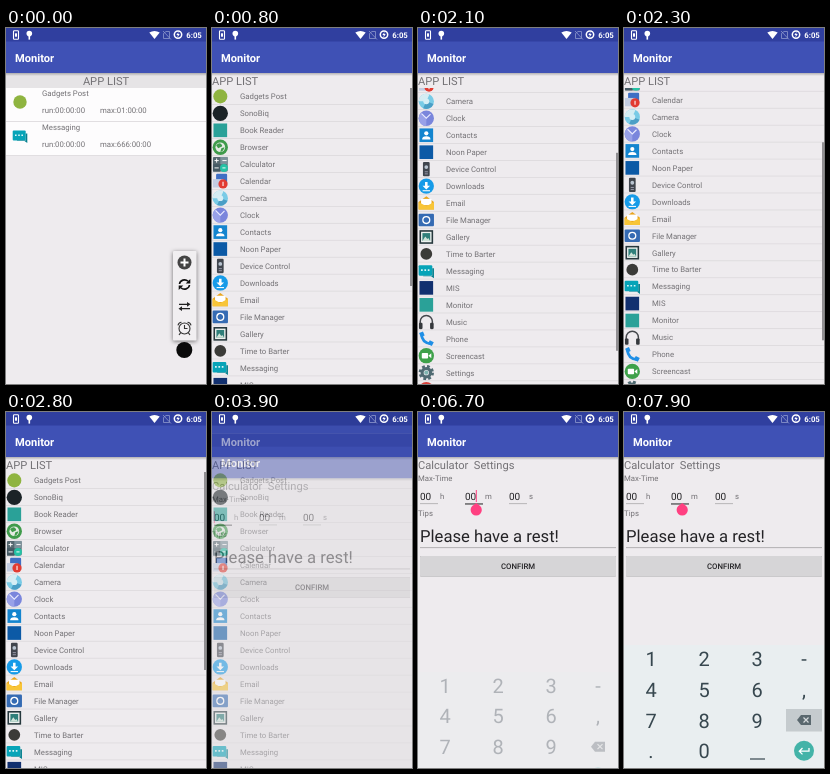
Recreate the animation shown at these times as an HTML page. Size 200 by 356 pixels, loop 8 s.

```html
<!DOCTYPE html>
<html lang="en">
<head>
<meta charset="utf-8">
<title>Monitor</title>
<style>
  html, body { margin: 0; height: 100%; overflow: hidden; background: #000; }
  svg { display: block; }
  text { font-family: Roboto, sans-serif; white-space: pre; text-rendering: geometricPrecision; }
</style>
</head>
<body>
<svg id="stage" width="200" height="356" viewBox="0 0 200 356"></svg>
<script>
const GREY = '#737175', INK = '#242326', PINK = '#ff4081', SMALL = 7.78, LARGE = 11.11;

const rect = (x, y, w, h, fill, more = '') =>
  `<rect x="${x}" y="${y}" width="${w}" height="${h}" fill="${fill}" ${more}/>`;
const disc = (x, y, r, fill, more = '') =>
  `<circle cx="${x}" cy="${y}" r="${r}" fill="${fill}" ${more}/>`;
const shape = (d, fill) => `<path d="${d}" fill="${fill}"/>`;
const line = (d, color, width = 1, more = '') =>
  `<path d="${d}" fill="none" stroke="${color}" stroke-width="${width}" ${more}/>`;
// y is the middle of the capital letters
const text = (x, y, s, size = SMALL, fill = GREY, more = '') =>
  `<text x="${x}" y="${y + size * 0.355}" font-size="${size}" fill="${fill}" ${more}>${s}</text>`;
const group = (id, body) => `<g id="${id}">${body}</g>`;
const at = (x, y, body, scale = 1) => `<g transform="translate(${x} ${y}) scale(${scale})">${body}</g>`;
const MID = 'text-anchor="middle" ', MEDIUM = 'font-weight="500" ', BOLD = 'font-weight="600" ';

// App icons, drawn around 0,0
const tile = fill => rect(-6.5, -6.5, 13, 13, fill);
const icon = {
  news: disc(0, 0, 6.7, '#8fb440'),
  sound: disc(0, 0, 7.3, '#1b2327'),
  teal: tile('#2aa198'),
  browser: disc(0, 0, 7.3, '#3f9b4b') + disc(0, 0, 4.6, '#e4ebe4') +
    shape('M-4-2Q-1-5 1-3T0 0L-2 1ZM1 1L4 0Q3 4 0 4.4Z', '#3f9b4b'),
  calculator: rect(-7, -7, 14, 14, '#566870', 'rx="1"') + rect(0, -7, 7, 7, '#7d929b') +
    rect(-7, 0, 7, 7, '#455a64') + disc(3.5, 3.5, 3.8, '#25c2a5') +
    line('M-5.5-3.5h4M-3.5-5.5v4M2-3.5h4M-5.5 3.5h4M2 3.5h3', '#fff', 0.9),
  calendar: rect(-4, -7, 10.5, 10, '#3f6fc4', 'rx="1"') + rect(-7, -2, 10, 8, '#c3cde2') +
    disc(2.6, 2.6, 4.4, '#e23b32') + line('M2.6 .6v4', '#fff'),
  camera: disc(0, 0, 7.3, '#79cbe6') + shape('M0 0L-7.3 0A7.3 7.3 0 0 1 3-6.6Z', '#d5ecf2') +
    shape('M0 0L6.9 2.5A7.3 7.3 0 0 1-3 6.6Z', '#4b9fc6') + disc(0, 0, 2.8, '#d6eef5'),
  clock: disc(0, 0, 7.3, '#7a86dc') + shape('M-5-5.2L0 0V7.3A7.3 7.3 0 0 1-5-5.2Z', '#98a1e8') +
    line('M-4.5-4.5L0 0L4-4', '#e8eaff', 1.1),
  contacts: tile('#1485cf') + disc(0, -1.8, 2, '#fff') + shape('M-4 4Q-4 1 0 1T4 4Z', '#fff'),
  paper: tile('#0c5aa6'),
  remote: rect(-3.2, -6.8, 6.4, 13.6, '#40454d', 'rx="1"') + disc(0, -2, 1.8, '#b9c4d0') +
    line('M-1.5 2.5h3M-1.5 4.5h3', '#aab', 0.8),
  downloads: disc(0, 0, 7.3, '#169be8') + shape('M-1.2-4h2.4v3.6h2.4L0 3.2-3.6-.4h2.4Z', '#fff') +
    line('M-3.5 4.4h7', '#fff'),
  email: shape('M-7.3-1L0-6.5 7.3-1V6H-7.3Z', '#e9a41c') + rect(-5, -4, 10, 6, '#fff') +
    shape('M-7.3-1L0 3 7.3-1V6H-7.3Z', '#f8c537'),
  files: rect(-7.3, -6, 14.6, 12, '#356bb3', 'rx="1"') + disc(0, 0, 3.3, 'none', 'stroke="#fff" stroke-width="1.2"'),
  gallery: tile('#26383d') + rect(-5, -5, 10, 10, '#eef2f0') + rect(-3.7, -3.7, 7.4, 7.4, '#2f7f7a') +
    shape('M-3.7 3.7L-1-.5 1 2 2 1 3.7 3.7Z', '#cfe3d8'),
  barter: disc(0, 0, 5.6, '#3b3b38'),
  messaging: rect(-7.3, -5.5, 13, 10, '#06a4b8', 'rx="1"') + shape('M5.7-2.5H7.3V7L4.5 5H-3V4.5H5.7Z', '#06808f') +
    line('M-5-.8h1.6M-1.8-.8h1.6M1.4-.8h1.6', '#d9f6f8', 1.6),
  mis: tile('#12306f'),
  music: line('M-5.8 3V0A5.8 6 0 0 1 5.8 0V3', '#45484c', 1.4) +
    rect(-7, 1, 3.4, 6, '#35383c', 'rx="1"') + rect(3.6, 1, 3.4, 6, '#35383c', 'rx="1"'),
  phone: line('M-4.6-5Q-4.5 4 4.8 5', '#1f8fe6', 2.6) +
    line('M-5-6.2l1.6 3.8M2.4 3.2l3.8 2', '#1f8fe6', 4),
  screencast: disc(0, 0, 7.3, '#3ea14a') + rect(-4.3, -2.6, 6, 5.2, '#fff', 'rx=".8"') + shape('M2 0L4.8-2.4V2.4Z', '#fff'),
  settings: disc(0, 0, 6, 'none', 'stroke="#4f6a72" stroke-width="2.6" stroke-dasharray="2.6 2.11"') +
    disc(0, 0, 4, 'none', 'stroke="#4f6a72" stroke-width="3"') + disc(0, 0, 2, '#7fb5b0'),
  recorder: disc(0, 0, 7.3, '#d8403a'),
};

const apps = [
  ['Gadgets Post', 'news'], ['SonoBiq', 'sound'], ['Book Reader', 'teal'], ['Browser', 'browser'],
  ['Calculator', 'calculator'], ['Calendar', 'calendar'], ['Camera', 'camera'], ['Clock', 'clock'],
  ['Contacts', 'contacts'], ['Noon Paper', 'paper'], ['Device Control', 'remote'],
  ['Downloads', 'downloads'], ['Email', 'email'], ['File Manager', 'files'], ['Gallery', 'gallery'],
  ['Time to Barter', 'barter'], ['Messaging', 'messaging'], ['MIS', 'mis'], ['Monitor', 'teal'],
  ['Music', 'music'], ['Phone', 'phone'], ['Screencast', 'screencast'], ['Settings', 'settings'],
  ['Sound Recorder', 'recorder'],
];
const ROW = 16.96, VIEW = 296, THUMB = 198;

const page = (id, body) => group(id,
  rect(0, 0, 200, 356, '#eeebee') + body + rect(0, 45, 200, 3, 'url(#shade)') +
  rect(0, 0, 200, 14, '#303f9f') + rect(0, 13.5, 200, 31.5, '#3f51b5') +
  text(9, 30, 'Monitor', LARGE, '#fff', BOLD));

const task = (y, name, max, image) =>
  rect(0, y, 200, 33.5, '#fdfcfd') + rect(0, y + 33, 200, 0.8, '#dcdadc') + at(14, y + 14, icon[image]) +
  text(36, y + 5.7, name) + text(36, y + 22.5, 'run:00:00:00') + text(94, y + 22.5, 'max:' + max);

const menu =
  rect(167, 223, 23.5, 89.5, '#f1eff1', 'rx="1" style="filter:drop-shadow(0 1px 2px #0008)"') +
  disc(178.5, 234.5, 7, '#444') + line('M174.5 234.5h8M178.5 230.5v8', '#fff', 2) +
  at(178.5, 256.5, line('M-5-.5A5 4.6 0 0 1 3.6-3.2M5 .5A5 4.6 0 0 1-3.6 3.2', '#111', 1.6) +
    shape('M5.8-5.6V-.9H1.2ZM-5.8 5.6V.9H-1.2Z', '#111')) +
  at(178.5, 278.5, line('M-5.5-2.2H3M5.5 2.2H-3', '#222', 1.3) +
    shape('M2.5-4.6L6-2.2 2.5.2ZM-2.5-.2L-6 2.2-2.5 4.6Z', '#222')) +
  at(178.5, 300.5, disc(0, 0, 5.5, 'none', 'stroke="#333" stroke-width="1.1"') +
    line('M0-3.5V0H3M-3.8 4.2L-5.5 6.5M3.8 4.2L5.5 6.5M-6.5-3.2A4 4 0 0 1-3-6.3M6.5-3.2A4 4 0 0 0 3-6.3', '#333', 1.1)) +
  disc(178.3, 322, 8, '#0a0a0a') + disc(178.5, 234.5, 10, '#000', 'id="tap" opacity="0"');

const home = page('home',
  rect(0, 45, 200, 15, '#e6e4e6') + text(100, 53, 'APP LIST', LARGE, GREY, MID) +
  task(60, 'Gadgets Post', '01:00:00', 'news') + task(94, 'Messaging', '666:00:00', 'messaging') + menu);

const list = page('list',
  text(0, 53, 'APP LIST', LARGE) +
  `<svg y="60" width="200" height="${VIEW}">` +
  group('rows', apps.map(([name, image], i) =>
    at(0, i * ROW, at(8.3, 8.4, icon[image], 1.05) + text(28, 8.5, name) +
      rect(0, 16.2, 200, 0.7, '#d9d6d9'))).join('') +
    rect(0, 4 * ROW, 200, ROW, '#000', 'id="press" opacity="0"')) +
  rect(198, 0, 2, THUMB, '#918f92', 'id="thumb"') + '</svg>');

const field = (x, unit, id) =>
  text(x, 84, '00', 10, INK) + text(x + 20, 84.5, unit) + rect(x, 91.3, 18, 0.8, '#aaa8aa', `id="${id}"`);

const settings = page('settings',
  text(0, 53, 'Calculator  Settings', LARGE) + text(0, 66, 'Max-Time') +
  field(2, 'h', 'hours') + field(47, 'm', 'minutes') + field(91, 's', 'seconds') +
  rect(1.8, 78, 1, 12, PINK, 'id="caret1"') + rect(57.8, 78, 1, 12, PINK, 'id="caret2"') +
  group('handle', shape('M58.2 91L62.2 94A5.6 5.6 0 1 1 54.2 94Z', PINK)) +
  text(0, 101.5, 'Tips') + text(2, 124, 'Please have a rest!', 16.67, INK) + rect(2, 135.3, 196, 0.8, '#a3a1a3') +
  rect(2, 144, 196, 20.5, '#d6d5d7', 'rx="1" style="filter:drop-shadow(0 .6px .6px #0006)"') +
  text(100, 154.5, 'CONFIRM', SMALL, INK, MID + MEDIUM));

const KEYS = ['123-', '456,', '789', '.0'];
const keyboard = group('keyboard',
  rect(0, 233, 200, 123, '#e9eef0') + rect(162, 297, 36, 22.5, '#c5cbce', 'id="erase"') +
  KEYS.map((row, r) => [...row].map((key, c) =>
    text([27, 80, 133, 180][c], 247 + r * 30.7, key, 20, '#37474f', MID)).join('')).join('') +
  line('M126 347h15', '#37474f', 1.2) +
  shape('M173 308L177 303H187V313H177Z', '#5a686e') + line('M179.5 305.5l5 5m0-5l-5 5', '#d5dadc', 1.2) +
  disc(180, 338.8, 10, '#43b3a8') +
  line('M185 336v3.2H175.5M178.5 336l-3.2 3.2 3.2 3.2', '#fff', 1.3));

const status =
  rect(7.5, 2.8, 5, 8.4, 'none', 'rx=".8" stroke="#fff" stroke-width="1.1"') + rect(9, 5.3, 2, 3.4, '#fff') +
  disc(23.3, 5.6, 2.8, '#fff') + rect(22.5, 7, 1.6, 4.6, '#fff') +
  shape('M143.3 4.5Q148.5 1.5 153.7 4.5L148.5 11Z', '#fff') +
  line('M157.5 10.5V5.5L160 3.5H163.5V10.5ZM157 3l8 8.5', '#8f98cd', 0.8) +
  disc(172, 6.6, 3.7, 'none', 'stroke="#fff" stroke-width="1.5"') +
  shape('M172.6 4L170.3 7.1H171.8L171.4 9.4 173.7 6.1H172.2Z', '#fff') +
  text(195.8, 6.9, '6:05', SMALL, '#fff', 'text-anchor="end" ' + BOLD);

const stage = document.getElementById('stage');
stage.innerHTML = '<linearGradient id="shade" x2="0" y2="1"><stop stop-opacity=".25"/>' +
  '<stop offset="1" stop-opacity="0"/></linearGradient>' + home + list + settings + keyboard + status;

const el = Object.fromEntries([...stage.querySelectorAll('[id]')].map(e => [e.id, e]));
const clamp = v => Math.max(0, Math.min(1, v));
const fade = (e, v) => e.setAttribute('opacity', +v);
const moveY = (e, y) => e.setAttribute('transform', `translate(0 ${y})`);

// The new page rises and fades in while the one below darkens
function open(next, below, age) {
  fade(next, age < 0 ? 0 : 1 - (1 - clamp(age / 150)) ** 4);
  moveY(next, 28.5 * (1 - clamp(age / 350)) ** 5);
  if (age >= 0) fade(below, age < 350 ? 1 - 0.3 * clamp((age + 10) / 217) : 0);
}

function focus(e, on) {
  e.setAttribute('height', on ? 1.3 : 0.8);
  e.setAttribute('fill', on ? '#505052' : '#aaa8aa');
}

const blink = (t, start) => Math.floor((t - start) / 500) % 2 === 0;

function scrollAt(t) {
  const down = clamp((t - 1350) / 850), back = clamp((t - 2250) / 550);
  return 98.2 * (1 - (1 - down) ** 2) * (1 - back) ** 2;
}

function draw(t) {
  fade(el.home, 1);
  fade(el.tap, t >= 400 && t < 600 ? 0.12 : 0);
  open(el.list, el.home, t - 480);
  open(el.settings, el.list, t - 3880);

  const scroll = scrollAt(t);
  moveY(el.rows, -scroll);
  moveY(el.thumb, scroll * THUMB / VIEW);
  fade(el.thumb, clamp((3000 - t) / 200));
  fade(el.press, t >= 3500 && t < 3880 ? 0.08 : 0);

  const second = t >= 6300;
  focus(el.hours, !second);
  focus(el.minutes, second);
  fade(el.caret1, !second && blink(t, 3900));
  fade(el.caret2, t >= 6400 && blink(t, 6400));
  fade(el.handle, clamp((t - 6300) / 200));

  const rise = clamp((t - 6600) / 300);
  fade(el.keyboard, rise);
  moveY(el.keyboard, 60 * (1 - rise) ** 2);
  fade(el.erase, t >= 7900);
}

function tick() {
  draw(Math.floor(performance.now() % 8000 / 100) * 100);
  requestAnimationFrame(tick);
}
tick();
</script>
</body>
</html>
```
